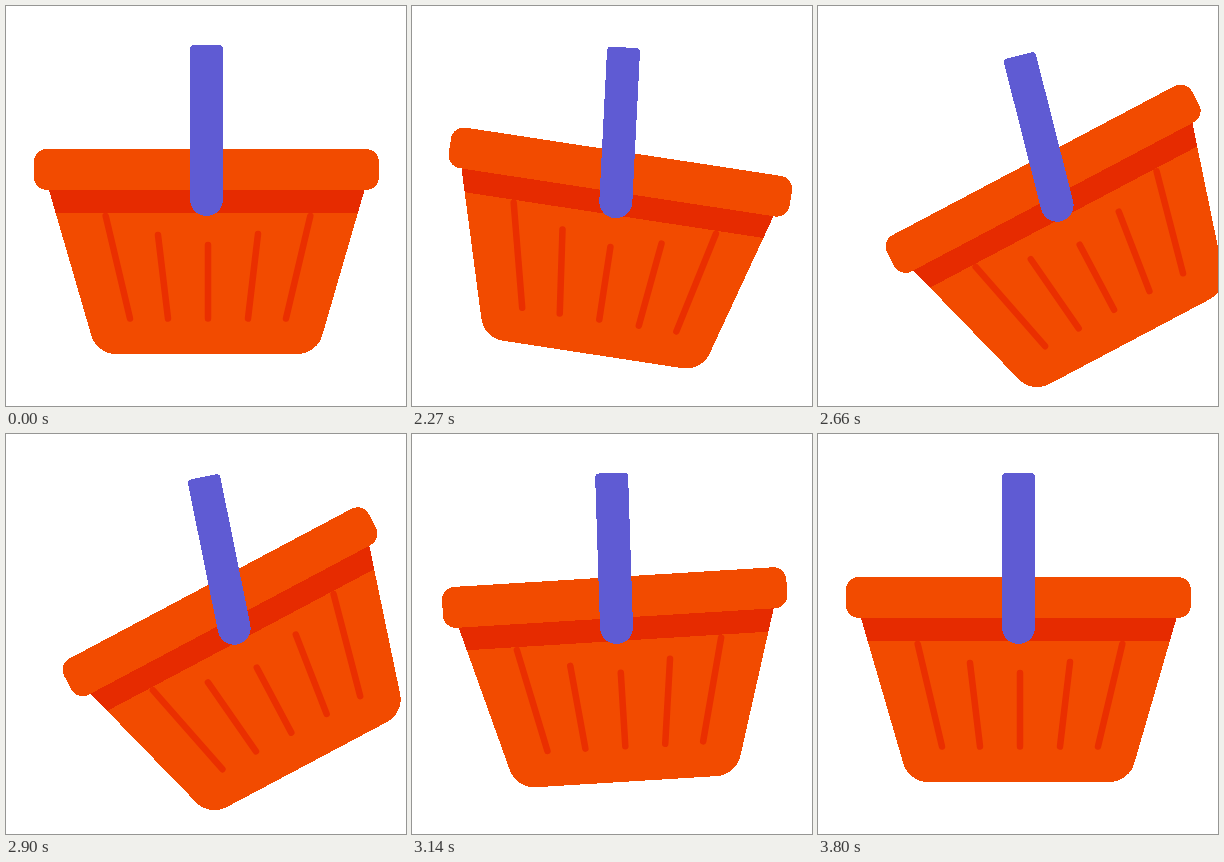
An HTML page that plays this animation: 400 by 400 pixels, repeating every 3.83 s.

```html
<!DOCTYPE html>
<html lang="en">
<head>
<meta charset="utf-8">
<title>Swinging basket</title>
<style>
  html, body { margin: 0; width: 100%; height: 100%; overflow: hidden; background: #fff; }
  svg { display: block; width: 100vw; height: 100vh; }
  .crisp { shape-rendering: crispEdges; }
</style>
</head>
<body>
<svg viewBox="0 0 400 400">
  <g id="basket">
    <path class="crisp" fill="#f24b00" d="M41.8 180 L85 328.5 A26 26 0 0 0 110 348 H291.5 A26 26 0 0 0 316.5 328.5 L359.7 180 Z"/>
    <path class="crisp" fill="#e62b00" d="M41.8 180 L49.6 207 H351.9 L359.7 180 Z"/>
    <path fill="none" stroke="#ea2f00" stroke-width="6.5" stroke-linecap="round"
      d="M99.7 210 L124 312.5 M152 229 L162 312.5 M202 239 V312.5 M252 228 L242 312.5 M304.3 210 L280 312.5"/>
    <rect class="crisp" x="28" y="143" width="345" height="41" rx="13" fill="#f24b00"/>
  </g>
  <path id="handle" class="crisp" fill="#5f5bd3" d="M188 39 H213 A4 4 0 0 1 217 43 V193.5 A16.5 16.5 0 0 1 184 193.5 V43 A4 4 0 0 1 188 39 Z"/>
</svg>
<script>
  const LOOP = 3830, START = 2030, STEP = 30;
  const PIVOT = '200.5 193.5';

  const basket = document.getElementById('basket');
  const handle = document.getElementById('handle');

  function place(el, x, y, angle) {
    el.setAttribute('transform', `translate(${x} ${y}) rotate(${angle} ${PIVOT})`);
  }

  function draw(now) {
    const raw = now % LOOP;
    const t = raw < START ? 0 : START + Math.floor((raw - START) / STEP) * STEP;

    // smooth 0 to 1 between two times
    const ramp = (from, to) => {
      const p = Math.min(1, Math.max(0, (t - from) / (to - from)));
      return p * p * (3 - 2 * p);
    };

    // wind up, swing left, swing back past rest, settle
    const tilt = 9 * ramp(2005, 2247) - 37.2 * ramp(2247, 2685)
      + 37.7 * ramp(2880, 3310) - 9.5 * ramp(3310, 3800);
    const lean = 4 * ramp(2000, 2200) - 18.3 * ramp(2200, 2675) + 14.3 * ramp(2760, 3250);
    const x = 38.8 * (ramp(2180, 2680) - ramp(2710, 3247));
    const y = 8.5 * (ramp(2180, 2450) - ramp(2450, 3000));

    place(basket, x, y, tilt);
    place(handle, x, y, lean);
  }

  const begin = performance.now();
  function tick() {
    draw(performance.now() - begin);
    requestAnimationFrame(tick);
  }
  tick();
</script>
</body>
</html>
```
